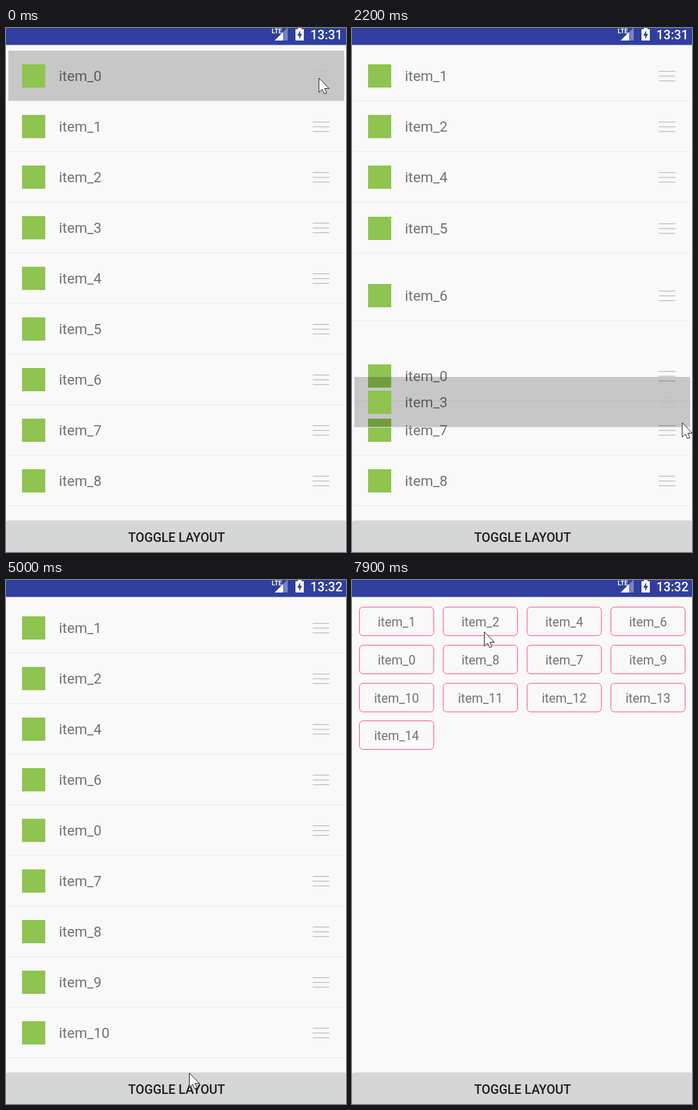
Recreate the animation shown at these times as an HTML page with a canvas. Size 572x880 px, loop 8 s.

```html
<!DOCTYPE html>
<html lang="en">
<head>
<meta charset="utf-8">
<title>Drag and swipe list</title>
<style>
html, body { margin: 0; width: 100%; height: 100%; overflow: hidden; background: #f9f9f9; }
canvas { display: block; }
</style>
</head>
<body>
<canvas id="stage" width="572" height="880"></canvas>
<script>
const ctx = document.getElementById('stage').getContext('2d');
const LOOP = 8000, CLOCK_AT = 3200, GRID_AT = 5600;
const ROW = 85, WIDTH = 572, MOVE = 220, SWAP_LAG = 25, FADE = 120;
const GREY = 'rgba(0,0,0,.2)', INK = 'rgba(0,0,0,.54)';

const linear = p => p;
const accel = p => p ** 2.2;
const decel = p => Math.sin(p * Math.PI / 2);
const smooth = p => (1 - Math.cos(p * Math.PI)) / 2;
const between = (t, start, end, curve = smooth) =>
  curve(Math.min(1, Math.max(0, (t - start) / (end - start))));

const drags = [
  { item: 0, grab: 0, start: 100, end: 910, release: 1100, dist: 520, curve: accel },
  { item: 3, grab: 1800, start: 1840, end: 2305, release: 2450, dist: 403, curve: decel }
];
const swipes = [
  { item: 5, start: 2950, end: 3305, dir: -1 },
  { item: 3, start: 3850, end: 4280, dir: 1 }
];

// Pointer moves: start, end, x, y, curve
const pointerMoves = [
  [30, 840, 537, 604, accel],
  [1150, 1770, 541, 263],
  [1770, 2235, 556, 666, decel],
  [2600, 2950, 510, 345],
  [2950, 3280, 270, 350],
  [3280, 3600, 296, 494],
  [3850, 4250, 540, 505],
  [4400, 5000, 309, 828],
  [5600, 6450, 334, 152],
  [6450, 6900, 201, 176, linear],
  [6900, 7220, 83, 185, decel],
  [7380, 7900, 223, 87]
];
const tileDrag = { item: 8, grab: 6450, swap: 6920, release: 7380 };

// Play the gestures once to learn when each item moves up a row
const order = Array.from({ length: 15 }, (_, i) => i);
const shifts = [];

function dragOffset(d, t) {
  const offset = d.dist * between(t, d.start, d.end, d.curve);
  const rest = Math.floor(d.dist / ROW) * ROW;
  return offset + (rest - d.dist) * between(t, d.release, d.release + MOVE);
}

for (const d of drags) {
  let index = order.indexOf(d.item), passed = 0;
  for (let t = d.start; t < d.end; t++) {
    if (dragOffset(d, t) < ROW * (passed + 1)) continue;
    order[index] = order[index + 1];
    shifts.push({ item: order[index], at: t + SWAP_LAG });
    order[++index] = d.item;
    passed++;
  }
}
for (const s of swipes) {
  const index = order.indexOf(s.item);
  order.splice(index, 1);
  for (const item of order.slice(index)) shifts.push({ item, at: s.end + FADE });
}

function pointer(t) {
  let x = 527, y = 84;
  for (const [start, end, toX, toY, curve] of pointerMoves) {
    const p = between(t, start, end, curve);
    x += (toX - x) * p;
    y += (toY - y) * p;
  }
  return [x, y];
}

function rect(x, y, w, h, fill) {
  ctx.fillStyle = fill;
  ctx.fillRect(x, y, w, h);
}

function text(str, x, y, size, fill, align = 'left', weight = 400) {
  ctx.font = `${weight} ${size}px Roboto, sans-serif`;
  ctx.textAlign = align;
  ctx.fillStyle = fill;
  ctx.fillText(str, x, y);
}

function shape(points, fill, stroke) {
  ctx.beginPath();
  points.forEach(([x, y]) => ctx.lineTo(x, y));
  ctx.closePath();
  ctx.fillStyle = fill;
  ctx.fill();
  if (!stroke) return;
  ctx.strokeStyle = stroke;
  ctx.lineWidth = 1;
  ctx.stroke();
}

function drawRow(item, t, held) {
  let x = 0, y = 38 + item * ROW;
  for (const d of drags) if (d.item === item) y += dragOffset(d, t);
  for (const s of shifts) if (s.item === item) y -= ROW * between(t, s.at, s.at + MOVE);
  for (const s of swipes) if (s.item === item) x += s.dir * WIDTH * between(t, s.start, s.end);

  ctx.save();
  ctx.translate(x, Math.round(y));
  ctx.globalAlpha = Math.max(0, 1 - Math.abs(x) / WIDTH);
  if (held) rect(4, 0, 565, 84, GREY);
  rect(4, 84, 565, 1, '#e9e9e9');
  rect(27, 23, 39, 39, '#8ec44f');
  text('item_' + item, 89, 51, 24, INK);
  for (let i = 0; i < 3; i++) rect(516, 34 + 8 * i, 28, 1.5, '#c0c0c0');
  ctx.restore();
}

function drawList(t) {
  const held = drags.find(d => t >= d.grab && t < d.release + MOVE)
    || swipes.find(s => t >= s.start && t < s.end);
  ctx.save();
  ctx.beginPath();
  ctx.rect(0, 0, WIDTH, 820);
  ctx.clip();
  for (let item = 0; item < 15; item++)
    if (!held || item !== held.item) drawRow(item, t, false);
  if (held) drawRow(held.item, t, true);
  ctx.restore();
}

function drawTile(item, x, y, held) {
  ctx.beginPath();
  ctx.roundRect(x + .5, y + .5, 125, 48, 6);
  if (held) {
    ctx.fillStyle = 'rgba(0,0,0,.17)';
    ctx.fill();
  } else {
    ctx.strokeStyle = '#ff4081';
    ctx.lineWidth = 1;
    ctx.stroke();
  }
  text('item_' + item, x + 63, y + 33, 21.3, INK, 'center');
}

function drawGrid(t) {
  const { item: dragged, grab, swap, release } = tileDrag;
  const slot = i => [12 + 141 * (i % 4), Math.round(45 + 63.8 * Math.floor(i / 4))];
  const from = order.indexOf(dragged);
  order.forEach((item, i) => {
    if (i === from) return;
    const [x, y] = slot(i);
    const shift = i === from - 1 ? 141 * between(t, swap, swap + MOVE) : 0;
    drawTile(item, x + shift, y, false);
  });

  let [x, y] = slot(from);
  if (t >= grab) {
    const [px, py] = pointer(Math.min(t, release));
    const [endX, endY] = slot(from - 1);
    const back = between(t, release, release + MOVE);
    x = px - 40 + (endX - px + 40) * back;
    y = py - 43 + (endY - py + 43) * back;
  }
  drawTile(dragged, x, y, t >= grab && t < release + MOVE);
}

function drawStatus(t) {
  rect(0, 0, WIDTH, 28.5, '#303f9f');
  shape([[452, 21], [474, 21], [474, -1]], 'rgba(255,255,255,.35)');
  shape([[452, 21], [466, 21], [466, 7]], '#fff');
  rect(446, 0, 16, 11, '#303f9f');
  text('LTE', 447, 9, 10.5, '#fff', 'left', 700);
  rect(487, 2, 14, 19, '#fff');
  rect(491, 0, 6, 2, '#fff');
  shape([[495, 4], [490, 13], [493.5, 13], [493.5, 19], [498, 10], [495, 10]], '#303f9f');
  text(t < CLOCK_AT ? '13:31' : '13:32', 512, 19, 21.3, '#fff', 'left', 500);
}

function drawButton(t) {
  ctx.beginPath();
  ctx.roundRect(0, 827, WIDTH, 60, 4);
  ctx.fillStyle = t < GRID_AT ? '#d5d7d6' : '#d6d6d6';
  ctx.fill();
  text('TOGGLE LAYOUT', 287, 863, 21.2, 'rgba(0,0,0,.87)', 'center', 500);
}

function drawPointer(t) {
  const [x, y] = pointer(t);
  const arrow = [[0, 0], [0, 24], [5.5, 19], [9, 26.5], [13, 25], [9.5, 17.5], [17, 17.5]];
  shape(arrow.map(([px, py]) => [Math.round(x) + px - .5, Math.round(y) + py]), '#fff', '#111');
}

function draw(t) {
  rect(0, 0, WIDTH, 880, '#f9f9f9');
  (t < GRID_AT ? drawList : drawGrid)(t);
  drawButton(t);
  drawStatus(t);
  drawPointer(t);
}

const start = performance.now();
function tick() {
  draw((performance.now() - start) % LOOP);
  requestAnimationFrame(tick);
}
tick();
</script>
</body>
</html>
```
